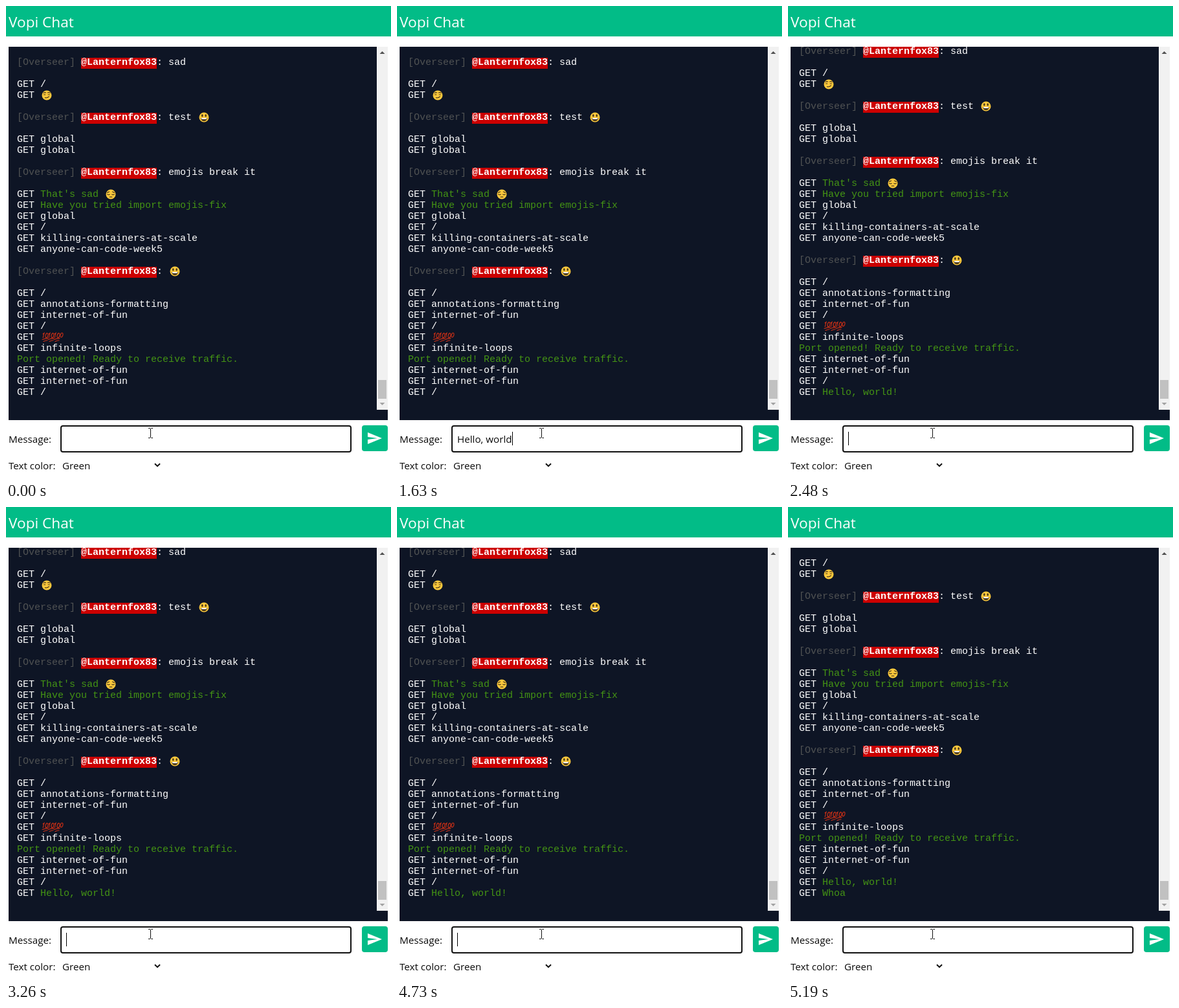
Write an HTML page that moves like this. It is 595x731 px and loops after 5.5 s.

```html
<!DOCTYPE html>
<html lang="en">
<head>
<meta charset="utf-8">
<title>Chat</title>
<style>
  html, body { margin: 0; width: 100%; height: 100%; overflow: hidden; background: #fff; }
  svg { display: block; }
  text { white-space: pre; }
  .ui { font: 15.2px "Open Sans", "Noto Sans", sans-serif; fill: #0a0a0a; }
  .title { font-size: 22.6px; fill: #fff; }
  .log { font: 15px "Liberation Mono", "Courier New", monospace; fill: #fff; }
  .role { fill: #505253; }
  .user { font-weight: bold; }
  .green { fill: #449414; }
  .line { fill: none; stroke: #4b3a1c; stroke-width: 1.2; stroke-linecap: round; }
  .red { fill: none; stroke: #cf3016; stroke-width: 1.1; stroke-linecap: round; }
</style>
</head>
<body>
<svg width="595" height="731" viewBox="0 0 595 731">
  <defs>
    <clipPath id="window"><rect x="4" y="63" width="569" height="561"/></clipPath>
    <circle id="face" r="7.5" fill="#fcc83c"/>
    <g id="smirk">
      <use href="#face"/>
      <path class="line" d="M-5-3.6q2-1.4 3.6-.4M1.4-4q2-1 3.8.4M-4.6-1h2.4M2-1h2.4M-2.6 3.6q3.8.8 6-1.8"/>
    </g>
    <g id="grin">
      <use href="#face"/>
      <ellipse cx="-2.7" cy="-2.6" rx="1.3" ry="2.1" fill="#4b3a1c"/>
      <ellipse cx="2.7" cy="-2.6" rx="1.3" ry="2.1" fill="#4b3a1c"/>
      <path d="M-5 1H5Q4.4 6 0 6T-5 1z" fill="#4b3a1c"/>
      <path d="M-4.2 1H4.2L3.7 3H-3.7z" fill="#fff"/>
    </g>
    <g id="pensive">
      <use href="#face"/>
      <path class="line" d="M-5.4-2.6l3-1.4M5.4-2.6l-3-1.4M-5.2 0q1.6 1.4 3.4.2M5.2 0q-1.6 1.4-3.4.2M-1.8 4.2h3.6"/>
    </g>
    <g id="hundred" class="red">
      <path d="M-6-5l2-1.6-1.8 7.2M-7 3.4q5-1.8 9-1.8M-5 6.4q3-1.6 6-1.6"/>
      <ellipse cx="0" cy="-2.8" rx="1.8" ry="3.6" transform="rotate(14 0 -2.8)"/>
    </g>
    <g id="hundreds">
      <use href="#hundred"/>
      <use href="#hundred" x="9"/>
      <use href="#hundred" x="18"/>
      <ellipse class="red" cx="23" cy="-3.4" rx="1.8" ry="3.4" transform="rotate(14 23 -3.4)"/>
    </g>
  </defs>

  <rect width="595" height="47" fill="#02bc87"/>
  <text class="ui title" x="4" y="33">Vopi Chat</text>

  <rect x="4" y="63" width="586" height="577" fill="#0e1525"/>
  <g clip-path="url(#window)"><g id="log" class="log"></g></g>

  <rect x="573" y="63" width="17" height="561" fill="#f1f1f1"/>
  <rect x="575" y="578" width="13" height="29" fill="#c1c1c1"/>
  <path d="M577.5 74l4-4 4 4z" fill="#505050"/>
  <path d="M577.5 613l4 4 4-4z" fill="#a3a3a3"/>

  <text class="ui" x="4" y="675">Message:</text>
  <rect x="85" y="649" width="448" height="40" rx="3" fill="#fff" stroke="#101010" stroke-width="2"/>
  <text id="draft" class="ui" x="93" y="675"></text>
  <rect id="caret" y="658" width="1" height="21"/>
  <rect x="550" y="648" width="40" height="40" rx="4" fill="#02bc87"/>
  <path transform="translate(557 656)" d="M2 21L24 12 2 3v7l15 2-15 2z" fill="#fff"/>

  <text class="ui" x="4" y="716">Text color:</text>
  <text class="ui" x="87" y="716">Green</text>
  <path d="M230 707.2l4 4 4-4" fill="none" stroke="#101010" stroke-width="2"/>
  <path d="M220 652.5h2.5l1 1 1-1h2.5M223.5 653v14M220 667.5h2.5l1-1 1 1h2.5" fill="none" stroke="#111"/>
</svg>
<script>
const LOOP = 5500, ROW = 17, CHAR = 9, LEFT = 17, FIRST_ROWS = 31;
const $ = id => document.getElementById(id);
const log = $('log'), draft = $('draft'), caret = $('caret');

const text = (column, y, content, style = '') =>
  `<text class="${style}" x="${LEFT + column * CHAR}" y="${y}">${content}</text>`;
const emoji = (id, column, y) =>
  id ? `<use href="#${id}" x="${LEFT + column * CHAR + 10}" y="${y - 4}"/>` : '';

const blank = () => '';
const get = (path, style, icon) => y =>
  text(0, y, 'GET') + text(4, y, path, style) + emoji(icon, 4 + path.length, y);
const say = (message, icon) => y =>
  text(0, y, '[Overseer]', 'role') +
  `<rect x="116" y="${y - 11}" width="117" height="17" fill="#c00"/>` +
  text(11, y, '@Lanternfox83', 'user') + text(24, y, ': ' + message) +
  emoji(icon, 26 + message.length, y);
const paths = list => list.split(' ').map(path => get(path));

const rows = [
  say('sad'), blank,
  get('/'), get('', '', 'smirk'), blank,
  say('test ', 'grin'), blank,
  ...paths('global global'), blank,
  say('emojis break it'), blank,
  get("That's sad ", 'green', 'pensive'),
  get('Have you tried import emojis-fix', 'green'),
  ...paths('global / killing-containers-at-scale anyone-can-code-week5'), blank,
  say('', 'grin'), blank,
  ...paths('/ annotations-formatting internet-of-fun /'),
  get('', '', 'hundreds'),
  get('infinite-loops'),
  y => text(0, y, 'Port opened! Ready to receive traffic.', 'green'),
  ...paths('internet-of-fun internet-of-fun /'),
  get('Hello, world!', 'green'),
  get('Whoa', 'green')
];
log.innerHTML = rows.map((row, i) => `<g>${row(91 + i * ROW)}</g>`).join('');

const typing = [
  { message: 'Hello, world!', sent: 2170, posted: 2480,
    keys: [230, 470, 620, 770, 920, 1080, 1230, 1230, 1390, 1470, 1550, 1630, 1940] },
  { message: 'Whoa', sent: 4730, posted: 4960, keys: [4120, 4350, 4425, 4500] }
];
const caretShown = [[230, 2720], [3260, 3730], [4120, 5190]];

function draw(now) {
  const t = now % LOOP;
  const current = typing.find(({ keys, sent }) => t >= keys[0] && t < sent);
  draft.textContent = current
    ? current.message.slice(0, current.keys.filter(key => key <= t).length) : '';
  const width = draft.textContent ? draft.getComputedTextLength() : 0;
  caret.setAttribute('x', Math.round(93 + width));
  caret.style.display = caretShown.some(([on, off]) => t >= on && t < off) ? '' : 'none';

  const posted = typing.filter(entry => t >= entry.posted).length;
  log.setAttribute('transform', `translate(0 ${-posted * ROW})`);
  [...log.children].forEach((row, i) => {
    row.style.display = i < FIRST_ROWS + posted ? '' : 'none';
  });
}

const start = performance.now();
function tick() {
  draw(performance.now() - start);
  requestAnimationFrame(tick);
}
tick();
</script>
</body>
</html>
```
